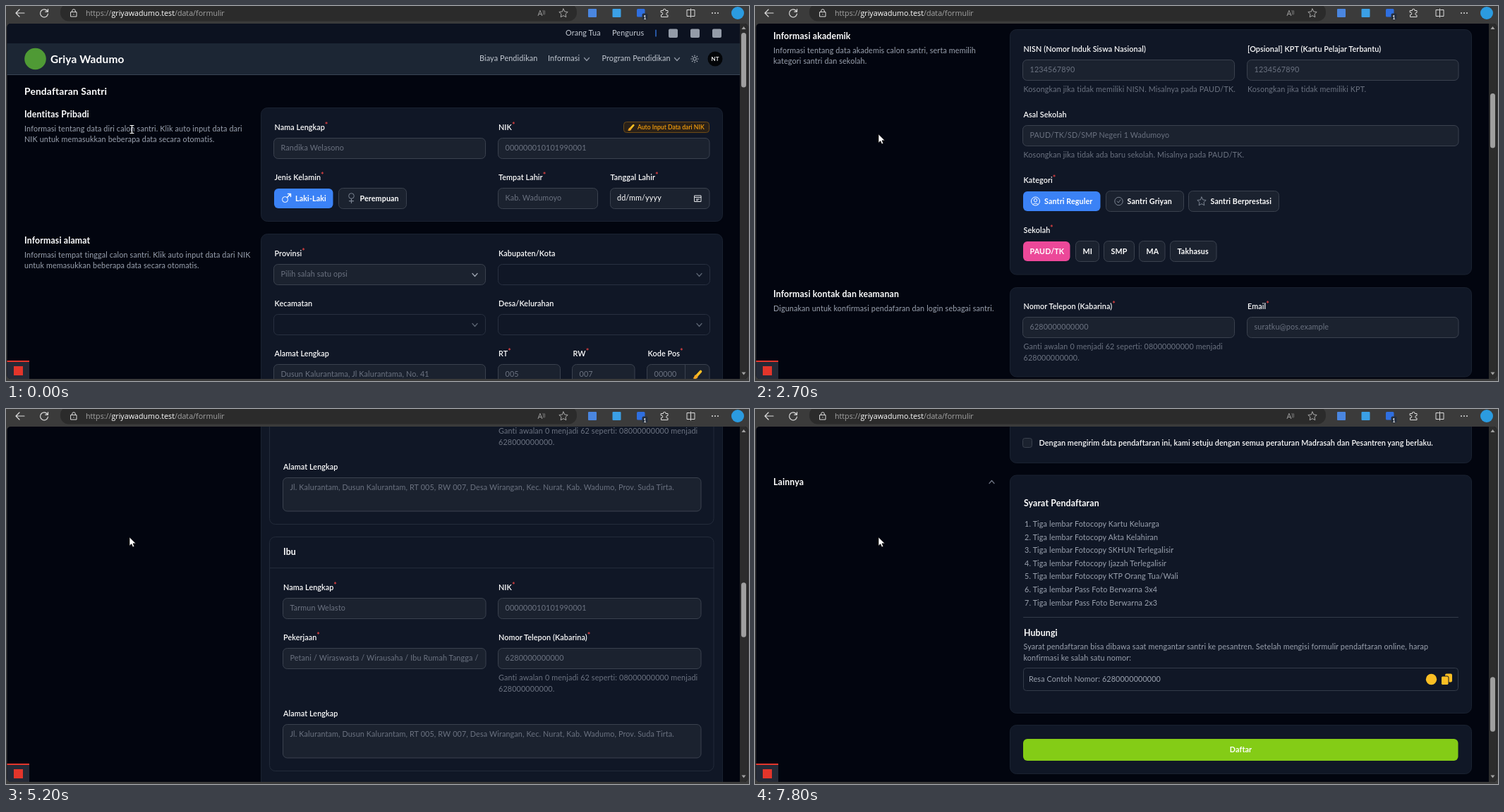
An HTML page that plays this animation: 1053x532 px, repeating every 8000 ms.

```html
<!DOCTYPE html>
<html lang="id">
<head>
<meta charset="utf-8">
<title>Formulir</title>
<style>
html, body { margin: 0; width: 100%; height: 100%; overflow: hidden; background: #3b3b3b; }
svg { display: block; }
text { font: 10.8px Lato, sans-serif; letter-spacing: .012em; fill: #9ba2af; white-space: pre; }
.label { font-weight: 600; fill: #fff; letter-spacing: .008em; }
.title { font-weight: 700; font-size: 12.3px; fill: #fff; }
.page { font-weight: 700; font-size: 13.8px; fill: #fff; }
.brand { font-weight: 700; font-size: 15.4px; fill: #fff; }
.button { font-weight: 700; font-size: 10.7px; fill: #fff; }
.badge { font-weight: 600; font-size: 8.6px; letter-spacing: 0; fill: #f59e0b; }
.dim { fill: #6b7280; }
.nav { fill: #c3c9d2; }
.star { fill: #ef4444; }
.url { font: 10.7px "Open Sans", sans-serif; fill: #a3a3a3; letter-spacing: 0; }
.mid { text-anchor: middle; }
path { fill: none; stroke-linecap: round; stroke-linejoin: round; }
</style>
</head>
<body>
<svg id="stage" width="1053" height="532" viewBox="0 0 1053 532"></svg>
<script>
const SIZES = { title: 12.3, page: 13.8, brand: 15.4, badge: 8.6 };
const PHONE = '6280000000000', NIK = '000000010101990001', AMBER = '#fbbf24';
const EDGE = '#3a414e', FAINT = '#202838', FIELD = '#1b222f', CARD = '#101726';

// All vertical text positions are centre lines of the capitals.
const text = (x, y, str, cls = '', extra = '') =>
  `<text x="${x}" y="${y + (SIZES[cls.split(' ')[0]] || 10.8) * .35}" class="${cls}" ${extra}>${str}</text>`;
const rect = (x, y, w, h, r, fill, stroke = 'none') =>
  `<rect x="${x}" y="${y}" width="${w}" height="${h}" rx="${r}" fill="${fill}" stroke="${stroke}"/>`;
const circle = (x, y, r, fill, stroke = 'none') =>
  `<circle cx="${x}" cy="${y}" r="${r}" fill="${fill}" stroke="${stroke}"/>`;
const path = (x, y, d, stroke, width = 1, fill = 'none') =>
  `<path transform="translate(${x} ${y})" d="${d}" stroke="${stroke}" stroke-width="${width}" style="fill:${fill}"/>`;
const line = (x, y, w, color = FAINT) => path(x, y, `M0 0h${w}`, color);
const chevron = (x, y, color = '#8b93a0', up = 1) => path(x, y, `M-3.5 ${-2 * up}L0 ${2 * up}L3.5 ${-2 * up}`, color, 1.3);
const starIcon = (x, y, r, color) => {
  let d = '';
  for (let i = 0; i < 10; i++) {
    const a = i * Math.PI / 5, k = i % 2 ? r * .48 : r;
    d += `${i ? 'L' : 'M'}${(k * Math.sin(a)).toFixed(2)} ${(-k * Math.cos(a)).toFixed(2)}`;
  }
  return path(x, y, d + 'Z', color);
};
const brush = (x, y, k = 1) => `<g transform="translate(${x} ${y}) scale(${k})">` +
  path(0, 0, 'M0 1L5-4.5', AMBER, 3.6) + path(0, 0, 'M-6 5Q-4 4-4 2Q-3-1 0 1Q2 3 0 5Q-3 7-6 5Z', 'none', 0, '#f5a623') + '</g>';

const label = (x, y, str, required) =>
  text(x, y, str + (required ? '<tspan class="star" dy="-3">*</tspan>' : ''), 'label');
const field = (x, y, w, str = '', h = 29) =>
  rect(x, y, w, h, 6, FIELD, EDGE) + text(x + 10, y + 14.2, str, 'dim');
const select = (x, y, str) =>
  (str ? field(x, y, 300, str) : rect(x, y, 300, 29, 6, CARD, '#283040')) + chevron(x + 285, y + 15, str ? '#9ca3af' : '#5b6472');
const card = (y, end, heading, desc = []) => rect(361.5, y, 654, end - y, 9, CARD, '#1a2231') +
  (heading ? text(26, y + 9.5, heading, 'title') : '') + desc.map((s, i) => text(26, y + 29.5 + i * 15.5, s)).join('');
const button = (x, y, w, str, fill, inset = 9.5) =>
  (fill ? rect(x, y, w + 1, 28, 6, fill) : rect(x - .5, y - .5, w + 1, 29, 6, FIELD, EDGE)) + text(x + inset, y + 14, str, 'button');
const phoneHint = (x, y) => text(x, y, 'Ganti awalan 0 menjadi 62 seperti: 08000000000 menjadi', 'dim') +
  text(x, y + 15.5, '628000000000.', 'dim');

const header = () =>
  rect(0, 25, 1042, 28, 0, '#0c1220') + rect(0, 53, 1042, 44, 0, '#1c2634') + line(0, 97.5, 1042, '#3a4555') +
  text(793, 38.5, 'Orang Tua', 'nav') + text(859, 38.5, 'Pengurus', 'nav') + path(921, 38.5, 'M0-4.5v9', '#3b82f6', 1.2) +
  [939, 970, 1001].map(x => rect(x, 32.5, 13, 12.5, 2, '#949ca8')).join('') +
  circle(41.5, 75, 15.3, '#4f9a35') + text(63, 75.5, 'Griya Wadumo', 'brand') +
  text(671, 74.5, 'Biaya Pendidikan', 'nav') + text(768, 74.5, 'Informasi', 'nav') + chevron(823, 75.5) +
  text(844.5, 74.5, 'Program Pendidikan', 'nav') + chevron(951, 75.5) +
  circle(976, 75, 2.3, 'none', '#b8bec8') +
  path(976, 75, 'M0-5v.7M0 4.3V5M-5 0h.7M4.3 0H5M-3.5-3.5l.4.4M3.1 3.1l.4.4M3.5-3.5l-.4.4M-3.1 3.1l-.4.4', '#b8bec8', 1.2) +
  circle(1005, 75, 10.5, '#030508') + text(1005, 75, 'NT', 'badge mid', 'style="fill:#fff;font-size:8px"') +
  text(26, 121, 'Pendaftaran Santri', 'page');

const identity = () => card(144.5, 305.5, 'Identitas Pribadi',
    ['Informasi tentang data diri calon santri. Klik auto input data dari', 'NIK untuk memasukkan beberapa data secara otomatis.']) +
  label(380.5, 172, 'Nama Lengkap', 1) + field(379.5, 187.5, 300, 'Randika Welasono') +
  label(698, 172, 'NIK', 1) + field(697.5, 187.5, 299.5, NIK) +
  rect(875.5, 164.5, 121, 15, 4, '#2a2118', '#6d4a16') + brush(885.5, 172.5, .75) + text(895, 172.3, 'Auto Input Data dari NIK', 'badge') +
  label(380.5, 243, 'Jenis Kelamin', 1) +
  button(380, 259, 82.5, 'Laki-Laki', '#3b82f6', 30) + circle(395.5, 274.5, 4, 'none', '#fff') + path(398.5, 271.5, 'M0 0L5-5M1-5h4v4', '#fff', 1.4) +
  button(472, 259, 95, 'Perempuan', '', 29.5) + circle(489.5, 269.5, 3.8, 'none', '#7b8492') + path(489.5, 273.5, 'M0 0v6M-3 3.2h6', '#7b8492', 1.2) +
  label(698, 243, 'Tempat Lahir', 1) + field(697.5, 258.5, 141, 'Kab. Wadumoyo') +
  label(856.5, 243, 'Tanggal Lahir', 1) + field(856.5, 258.5, 140.5) + text(866, 272.7, 'dd/mm/yyyy', '', 'style="fill:#fff"') +
  path(980.5, 273, 'M-4.5-4h9v8.5h-9ZM-4.5-1.5h9M-2 1h4M-2 2.7h2', '#e5e7eb');

const address = () => card(323.5, 574.5, 'Informasi alamat',
    ['Informasi tempat tinggal calon santri. Klik auto input data dari NIK', 'untuk memasukkan beberapa data secara otomatis.']) +
  label(380.5, 351, 'Provinsi', 1) + select(379.5, 366.5, 'Pilih salah satu opsi') +
  label(698, 351, 'Kabupaten/Kota') + select(697.5, 366.5) +
  label(380.5, 422, 'Kecamatan') + select(379.5, 437.5) + label(698, 422, 'Desa/Kelurahan') + select(697.5, 437.5) +
  label(380.5, 493, 'Alamat Lengkap') + field(379.5, 508.5, 300, 'Dusun Kalurantama, Jl Kalurantama, No. 41', 47.5) +
  label(698, 493, 'RT', 1) + field(697.5, 508.5, 88, '005') + label(803.5, 493, 'RW', 1) + field(802.5, 508.5, 88.5, '007') +
  label(909.5, 493, 'Kode Pos', 1) + field(908.5, 508.5, 88.5, '00000') + path(962.5, 508.5, 'M0 0v29', EDGE) + brush(979.5, 523);

const academic = () => card(592.5, 940, 'Informasi akademik',
    ['Informasi tentang data akademis calon santri, serta memilih', 'kategori santri dan sekolah.']) +
  label(380.5, 620, 'NISN (Nomor Induk Siswa Nasional)') + field(379.5, 635.5, 300, '1234567890') +
  text(380.5, 677.5, 'Kosongkan jika tidak memiliki NISN. Misalnya pada PAUD/TK.', 'dim') +
  label(698, 620, '[Opsional] KPT (Kartu Pelajar Terbantu)') + field(697.5, 635.5, 299.5, '1234567890') +
  text(698, 677.5, 'Kosongkan jika tidak memiliki KPT.', 'dim') +
  label(380.5, 713, 'Asal Sekolah') + field(379.5, 728.5, 617.5, 'PAUD/TK/SD/SMP Negeri 1 Wadumoyo') +
  text(380.5, 770, 'Kosongkan jika tidak ada baru sekolah. Misalnya pada PAUD/TK.', 'dim') +
  label(380.5, 806, 'Kategori', 1) +
  button(380, 822, 108.5, 'Santri Reguler', '#3b82f6', 30) + circle(397.5, 836, 6, 'none', '#fff') + circle(397.5, 834.5, 2.2, 'none', '#fff') + path(397.5, 840, 'M-3.7.5Q0-3 3.7.5', '#fff') +
  button(498, 822, 109, 'Santri Griyan', '', 29.5) + circle(515.5, 836, 5.7, 'none', '#7b8492') + path(515.5, 836, 'M-2.3 0L-.5 2L2.5-2', '#7b8492') +
  button(615, 822, 127, 'Santri Berprestasi', '', 30.5) + starIcon(633, 836.5, 6.5, '#7b8492') +
  label(380.5, 877, 'Sekolah', 1) +
  button(380, 893, 65.5, 'PAUD/TK', '#ec4899') + button(455, 893, 32, 'MI') + button(495, 893, 42, 'SMP') +
  button(545, 893, 35.5, 'MA') + button(589, 893, 64.5, 'Takhasus');

const contact = () => card(958.5, 1085, 'Informasi kontak dan keamanan', ['Digunakan untuk konfirmasi pendafaran dan login sebagai santri.']) +
  label(380.5, 985, 'Nomor Telepon (Kabarina)', 1) + field(379.5, 1000.5, 300, PHONE) + phoneHint(380.5, 1042.5) +
  label(698, 985, 'Email', 1) + field(697.5, 1000.5, 299.5, 'suratku@pos.example');

const group = (y, h, title, split) => rect(373.5, y + .5, 629.5, h, 8, 'none', '#232b3a') +
  text(393, y + 22, title, 'title') + line(374, y + split, 629, '#232b3a');
const parent = (y, title) => group(y, 332, title, 44.5) +
  label(393, y + 72, 'Nama Lengkap', 1) + field(392.5, y + 87.5, 287.5, 'Tarmun Welasto') +
  label(698, y + 72, 'NIK', 1) + field(697.5, y + 87.5, 287.5, NIK) +
  label(393, y + 143, 'Pekerjaan', 1) + field(392.5, y + 158.5, 287.5) +
  `<g clip-path="url(#inner)">${text(402.5, y + 172.7, 'Petani / Wiraswasta / Wirausaha / Ibu Rumah Tangga / dll', 'dim')}</g>` +
  label(698, y + 143, 'Nomor Telepon (Kabarina)', 1) + field(697.5, y + 158.5, 287.5, PHONE) + phoneHint(698, y + 200.5) +
  label(393, y + 251.5, 'Alamat Lengkap') +
  field(392.5, y + 266.5, 592.5, 'Jl. Kalurantam, Dusun Kalurantam, RT 005, RW 007, Desa Wirangan, Kec. Nurat, Kab. Wadumo, Prov. Suda Tirta.', 47.5);
const family = () => card(1103, 2024, 'Informasi Orang Tua', ['Informasi tentang data orang tua calon santri.']) +
  label(374.5, 1124.5, 'Nomor KK (Kartu Keluarga)', 1) + field(373.5, 1139.5, 629.5, '0000000101010001') +
  parent(1186, 'Ayah') + parent(1536, 'Ibu') +
  group(1886, 125, '[Opsional] Wali Lainnya', 62.5) + text(393, 1928, 'Isi ini jika walinya bukan Orang Tua (Ayah dan Ibu).') +
  rect(652.5, 1967.5, 72, 25, 6, FIELD, EDGE) + text(688.5, 1980, 'Tambahkan', 'button mid');

const checkbox = (y, ...rows) => rect(379.5, Math.floor(y - 6.5) + .5, 13, 13, 3, FIELD, EDGE) +
  rows.map((s, i) => text(402.5, y + (i - (rows.length - 1) / 2) * 18.5, s, 'label')).join('');
const consent = () => card(2041.5, 2302.5, 'Pernyataan Persetujuan', ['PBaca dan setujui semua syarat dan ketentuan.']) +
  checkbox(2069.5, 'Saya bersedia melunasi biaya pendidikan diawal karena putra/putri kami tidak mendaftar sebagai Santri Griyan.') +
  checkbox(2116, 'Apabila dikemudian hari putra/putri kami mengundurkan diri dengan alasan apapun, biaya pendidikan yang sudah', 'dibayarkan tidak bisa ditarik kembali.') +
  checkbox(2162.5, 'Sanggup mematuhi tata tertib dan Undang Undang Griya Pesantren Tanul Wirah Ki Lurah Wadumo.') +
  checkbox(2199.5, 'Bersedia tinggal di Asrama Pondok dan mengikuti semua kegiatan pesantren.') +
  checkbox(2237, 'Mengikuti sistem uang saku Griya Pesantren Tanul Wirah Ki Lurah Wadumo.') +
  checkbox(2274, 'Dengan mengirim data pendaftaran ini, kami setuju dengan semua peraturan Madrasah dan Pesantren yang berlaku.');

const papers = ['Fotocopy Kartu Keluarga', 'Fotocopy Akta Kelahiran', 'Fotocopy SKHUN Terlegalisir', 'Fotocopy Ijazah Terlegalisir',
  'Fotocopy KTP Orang Tua/Wali', 'Pass Foto Berwarna 3x4', 'Pass Foto Berwarna 2x3'];
const others = () => card(2320, 2657.5, 'Lainnya') + chevron(335.5, 2329.5, '#6b7280', -1) +
  text(381, 2360, 'Syarat Pendaftaran', 'title') +
  papers.map((s, i) => text(382, 2389.5 + i * 18.55, `${i + 1}. Tiga lembar ${s}`)).join('') +
  line(380.5, 2521.5, 616, '#333b49') + text(381, 2543.5, 'Hubungi', 'title') +
  text(380.5, 2563.5, 'Syarat pendaftaran bisa dibawa saat mengantar santri ke pesantren. Setelah mengisi formulir pendaftaran online, harap') +
  text(380.5, 2579, 'konfirmasi ke salah satu nomor:') +
  rect(380.5, 2593.5, 616, 32, 4, 'none', '#333b49') + text(388, 2609, 'Resa Contoh Nomor: ' + PHONE) +
  circle(958.5, 2609.5, 7.7, AMBER) + rect(978, 2601.5, 10, 12, 2, AMBER) + rect(972.5, 2605, 10.5, 12.5, 2, AMBER, CARD) +
  card(2674.5, 2743.5) + rect(380, 2694, 616.5, 31, 6, '#84cc16') + text(688.5, 2709, 'Daftar', 'button mid');

const browser = () =>
  rect(77, -4, 732, 25.5, 12, '#2b2b2b') +
  path(20, 10, 'M6 0H-6M-1-5L-6 0L-1 5', '#ddd', 1.2) +
  path(54, 10, 'M5-2A5.5 5.5 0 1 0 5.5 1M5.5-5.5v3.7H1.8', '#ddd', 1.2) +
  path(96, 10, 'M-4-1.5h8v6.5h-8ZM-2.3-1.5v-1.5a2.3 2.3 0 0 1 4.6 0v1.5M0 1.4v.5', '#ddd') +
  text(113, 10.3, 'https://<tspan fill="#fff">griyawadumo.test</tspan>/data/formulir', 'url') +
  text(753.5, 10.5, 'A<tspan dy="-3" font-size="7">))</tspan>', 'url') + starIcon(790, 10.5, 6.5, '#aaa') +
  rect(825, 4, 12, 12, 1, '#4a86e0') + rect(859.5, 4, 12, 12, 1, '#3ba0e6') + rect(894, 4, 11.5, 11.5, 1.5, '#2f6fe0') +
  rect(901.5, 10.5, 8, 9, 2, '#26303f') + text(905.5, 15.5, '1', 'badge mid', 'style="fill:#fff;font-size:7.5px"') +
  path(933, 10, 'M-4.5-3.5h3a1.8 1.8 0 1 1 3.5 0h3v3a1.8 1.8 0 1 0 0 3.5v2.5h-9.5v-3a1.8 1.8 0 1 0 0-3.5Z', '#ddd') +
  path(970.5, 10, 'M-1.2-4.5h-4.3v9h4.3M1.2-4.5h4.3v9H1.2M0-6V6', '#ddd') +
  [-4, 0, 4].map(d => circle(1005 + d, 10, 1, '#ddd')).join('') + circle(1037, 10, 9, '#2b9be0');

document.getElementById('stage').innerHTML =
  `<defs><clipPath id="view"><rect x="1.5" y="25" width="1050" height="504" rx="5"/></clipPath>
   <clipPath id="inner"><rect width="671" height="3000"/></clipPath></defs>` +
  rect(0, 0, 1053, 532, 0, '#3b3b3b') + browser() +
  '<g clip-path="url(#view)">' + rect(0, 25, 1053, 504, 0, '#02050f') +
  '<g id="doc">' + [header, identity, address, academic, contact, family, consent, others].map(part => part()).join('') + '</g>' +
  rect(1040, 25, 13, 504, 0, '#2c2c2c') + path(1045.5, 31, 'M-3 2L0-2L3 2Z', 'none', 0, '#a0a0a0') + path(1045.5, 521.5, 'M-3-2L0 2L3-2Z', 'none', 0, '#a0a0a0') +
  '<rect id="thumb" x="1042" width="7" height="77.5" rx="3.5" fill="#9f9f9f"/>' +
  rect(1, 503, 32, 26, 0, '#252a37') + rect(1, 503, 32, 2, 0, '#e3352b') + rect(11, 511, 13, 13, 0, '#e3352b') + '</g>' +
  '<g id="beam">' + path(178.5, 175, 'M-2.5-5.5h5M0-5.5v11M-2.5 5.5h5', '#fff', 1.2) + '</g>' +
  '<g id="arrow">' + path(175, 182, 'M0 0V12.2L2.8 9.6L4.7 13.8L6.8 12.9L5 8.8H8.8Z', '#111', .7, '#fff') + '</g>';

// Scroll positions in px at times in ms; flat stretches are pauses of the wheel.
const KEYS = [[0, 0], [100, 0], [400, 95], [700, 95], [1000, 190], [1300, 190], [1400, 215], [1500, 215], [1800, 302],
  [2700, 559], [2800, 559], [3900, 942], [4000, 942], [4400, 1087], [4500, 1087], [5200, 1355], [5300, 1355],
  [6000, 1623], [6500, 1802], [6600, 1802], [7100, 1971], [7800, 2226], [8000, 2226]];
function scrollAt(t) {
  const i = KEYS.findIndex(key => key[0] > t);
  const [t0, s0] = KEYS[i - 1], [t1, s1] = KEYS[i];
  return s0 + (s1 - s0) * (t - t0) / (t1 - t0);
}

const [doc, thumb, beam, arrow] = ['doc', 'thumb', 'beam', 'arrow'].map(id => document.getElementById(id));
function draw() {
  const t = Math.floor(performance.now() % 8000 / 100) * 100;
  const scroll = Math.round(scrollAt(t));
  doc.setAttribute('transform', `translate(0 ${-scroll})`);
  thumb.setAttribute('y', 38 + scroll * .1537);
  beam.style.display = t < 200 ? '' : 'none';
  arrow.style.display = t < 200 ? 'none' : '';
  requestAnimationFrame(draw);
}
draw();
</script>
</body>
</html>
```
